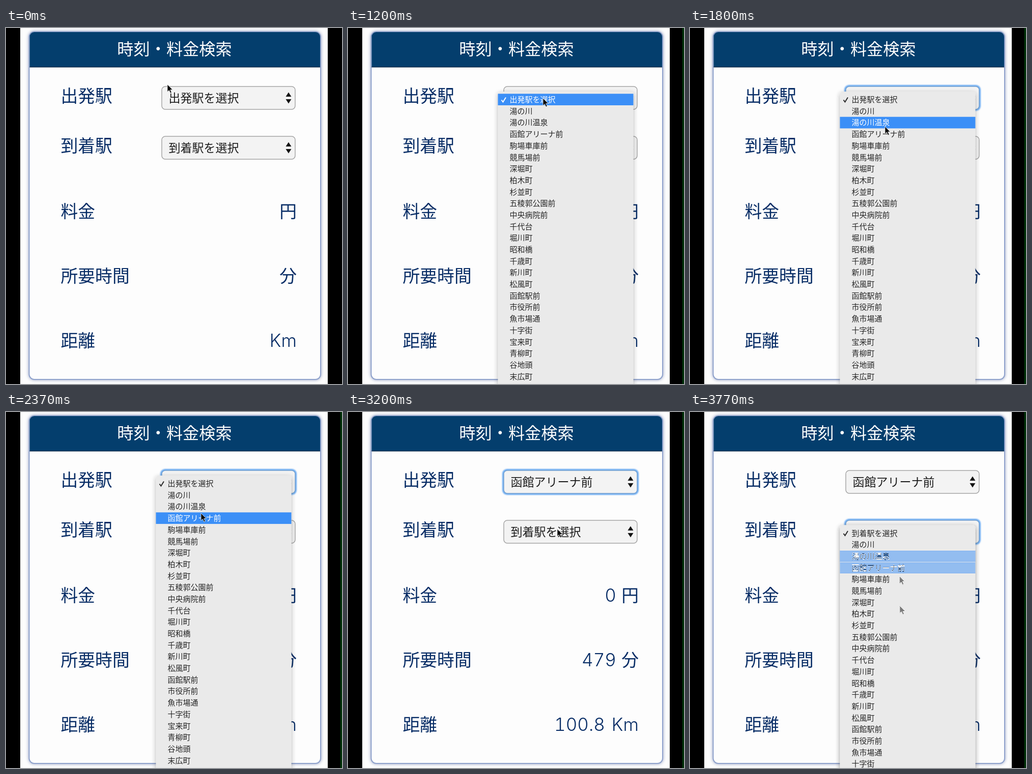
These frames come from a looping animation (660 px wide and 700 px high, 3800 ms). An HTML page:

```html
<!DOCTYPE html>
<html lang="ja">
<head>
<meta charset="utf-8">
<title>時刻・料金検索</title>
<style>
  html, body { margin: 0; width: 100%; height: 100%; overflow: hidden; background: #000; }
  svg { display: block; width: 100vw; height: 100vh; }
  text { font-family: "Noto Sans CJK JP", "Noto Sans CJK", sans-serif; font-weight: 350; white-space: pre; }
  .latin { font-family: Inter, "DejaVu Sans", sans-serif; font-weight: 300; font-variant-numeric: tabular-nums; }
</style>
</head>
<body>
<svg viewBox="0 0 660 700">
  <defs>
    <filter id="glow" x="-10%" y="-10%" width="120%" height="120%">
      <feDropShadow dx="0" dy="0" stdDeviation="3" flood-color="#6f7fae" flood-opacity=".75"/>
    </filter>
    <filter id="shadow" x="-10%" y="-5%" width="120%" height="110%">
      <feDropShadow dx="0" dy="3" stdDeviation="4" flood-color="#333" flood-opacity=".38"/>
    </filter>
    <filter id="soft" x="-10%" y="-30%" width="120%" height="160%">
      <feGaussianBlur stdDeviation="1.3"/>
    </filter>
    <pattern id="lines" width="2" height="2" patternUnits="userSpaceOnUse">
      <rect width="2" height="1" fill="#fff"/>
    </pattern>
    <mask id="oddLines" maskUnits="userSpaceOnUse" x="0" y="0" width="660" height="700">
      <rect width="660" height="700" fill="url(#lines)"/>
    </mask>
  </defs>
  <g id="card"></g>
  <g id="live"></g>
</svg>
<script>
const LOOP = 3800;
const OPEN_1 = 1130, FADE_START = 2640, FADE_END = 2760, RESULT = 2790, OPEN_2 = 3450;
const RING_DELAY = 130, HOVER_LAG = 39, INTERLACE = 3770, FIELD = 34;
const ROW = 22.69, INK = '#082d66';
const PROMPT_1 = '出発駅を選択', PROMPT_2 = '到着駅を選択', CHOICE = '函館アリーナ前';
const STATIONS = ('湯の川 湯の川温泉 函館アリーナ前 駒場車庫前 競馬場前 深堀町 柏木町 杉並町 五稜郭公園前 ' +
  '中央病院前 千代台 堀川町 昭和橋 千歳町 新川町 松風町 函館駅前 市役所前 魚市場通 十字街 宝来町 ' +
  '青柳町 谷地頭 末広町').split(' ');

const smooth = k => k * k * (3 - 2 * k);
const accelerate = k => k * k;

// Pointer path: time, x, y and the easing used to get there
const PATH = [
  [0, 317, 111], [600, 383, 138, smooth],
  [1350, 383, 138, smooth], [1900, 383, 199, smooth],
  [2820, 383, 199, smooth], [3180, 411, 230, smooth],
  [3652, 411, 235, smooth], [3804, 412, 381, accelerate]
];

function pointer(t) {
  const i = Math.max(1, PATH.findIndex(p => p[0] >= t));
  const [t0, x0, y0] = PATH[i - 1], [t1, x1, y1, ease] = PATH[i];
  const k = ease((t - t0) / (t1 - t0));
  return [x0 + (x1 - x0) * k, y0 + (y1 - y0) * k];
}

// Text whose glyphs are centred vertically on cy
const text = (x, cy, size, str, fill, attrs = '') =>
  `<text x="${x}" y="${cy + size * .37}" font-size="${size}" fill="${fill}" ${attrs}>${str}</text>`;

const box = (x, y, w, h, r, attrs) =>
  `<rect x="${x}" y="${y}" width="${w}" height="${h}" rx="${r}" ${attrs}/>`;

function selectBox(y, label, focused) {
  const ring = focused
    ? box(305.5, y - .5, 263, 46, 7, 'fill="none" stroke="#69aaf2" stroke-width="5" filter="url(#soft)"') : '';
  return ring +
    box(306, y, 262, 45, 7, `fill="#f3f3f3" stroke="${focused ? '#7ba4d0' : '#a6a6a6'}" stroke-width="1.5"`) +
    text(319.5, y + 22, 23, label, '#1c1c1c') +
    `<path d="M549.5 ${y + 20}h11l-5.5 -8.5zM549.5 ${y + 25}h11l-5.5 8.5z" fill="#111"/>`;
}

function menu(top, prompt, hovered, opacity) {
  const rows = [prompt, ...STATIONS].map((name, i) => {
    const cy = top + 15.5 + i * ROW, on = i === hovered, ink = on ? '#fff' : '#262626';
    return (on ? box(294.5, cy - 11.2, 266, ROW, 0, 'fill="#3b8ff7"') : '') +
      (i ? '' : `<path d="M301.5 ${cy + 1}l3 4l5.5 -9" fill="none" stroke="${ink}" stroke-width="2"/>`) +
      text(317.5, cy, 15, name, ink);
  }).join('');
  return `<g opacity="${opacity}">` +
    box(294.5, top, 266, 640, 5, 'fill="#eaeaea" filter="url(#shadow)"') + rows + '</g>';
}

const cursor = ([x, y]) =>
  `<path transform="translate(${x} ${y})" d="M0 0V14.5L3.4 11.5L5.9 17L8.3 16L5.9 10.5H10.3Z"
    fill="#0a0a0a" stroke="#fff" stroke-width=".7"/>`;

function overlay(t) {
  const hover = top => Math.max(0, Math.floor((pointer(t - HOVER_LAG)[1] - top - 4.3) / ROW));
  let out = '';
  if (t >= OPEN_1 && t < FADE_END) {
    const opacity = Math.min(1, (FADE_END - t) / (FADE_END - FADE_START));
    out = menu(125, PROMPT_1, hover(125), opacity);
  } else if (t >= OPEN_2) {
    out = menu(222.5, PROMPT_2, hover(222.5), 1);
  }
  return out + cursor(pointer(t));
}

function scene(t) {
  const done = t >= RESULT;
  const number = (x, cy, str) => text(x, cy, 35, str, INK, 'class="latin" text-anchor="end"');
  let out = selectBox(115, done ? CHOICE : PROMPT_1, t >= OPEN_1 + RING_DELAY && t < OPEN_2) +
    selectBox(213, PROMPT_2, t >= OPEN_2 + RING_DELAY);
  if (done) out += number(527, 360, '0') + number(527, 487, '479') + number(505, 614, '100.8');
  if (t >= 30) out += box(656.5, 0, 3.5, 700, 0, 'fill="#003008"');
  out += overlay(t);
  // Two video fields share the picture at the very end
  if (t >= INTERLACE) out += `<g mask="url(#oddLines)">${overlay(t + FIELD)}</g>`;
  return out;
}

document.getElementById('card').innerHTML =
  box(28, 0, 604, 700, 0, 'fill="#fdfdfd"') +
  box(45.5, 7.5, 572.5, 683.5, 10, 'fill="#fdfdfd" stroke="#8fa2cc" stroke-width="2" filter="url(#glow)"') +
  '<path d="M46.5 77V17a9 9 0 0 1 9 -9H608a9 9 0 0 1 9 9V77Z" fill="#043e6d"/>' +
  box(46.5, 76, 570.5, 1.5, 0, 'fill="#0a2c4c"') +
  text(331, 41, 32.2, '時刻・料金検索', '#fdfdfd', 'text-anchor="middle"') +
  [['出発駅', 133], ['到着駅', 231], ['料金', 360], ['所要時間', 487], ['距離', 614]]
    .map(([label, cy]) => text(107.5, cy, 33.8, label, INK)).join('') +
  text(571, 360, 33.8, '円', INK, 'text-anchor="end"') +
  text(571, 487, 33.8, '分', INK, 'text-anchor="end"') +
  text(571, 614, 35, 'Km', INK, 'class="latin" text-anchor="end"');

const live = document.getElementById('live');
let start, shown;
function draw(now) {
  start ??= now;
  const markup = scene(Math.min((now - start) % LOOP, INTERLACE));
  if (markup !== shown) live.innerHTML = shown = markup;
  requestAnimationFrame(draw);
}
requestAnimationFrame(draw);
</script>
</body>
</html>
```
